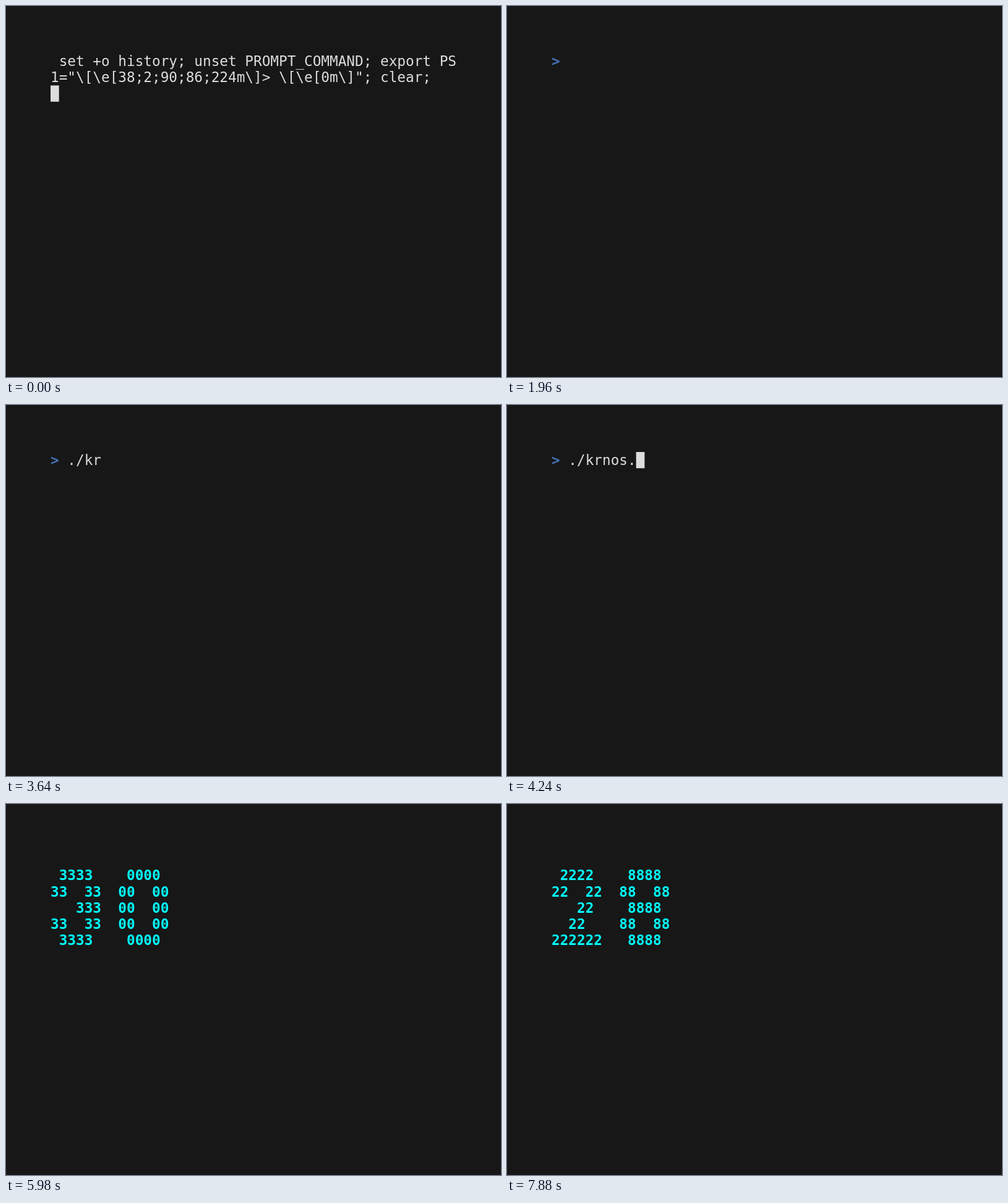
Animation, 800 px wide and 600 px high, one loop 8000 ms. Source, as an HTML page with a canvas:

```html
<!DOCTYPE html>
<html>
<head>
<meta charset="utf-8">
<style>
html, body { margin: 0; width: 100%; height: 100%; overflow: hidden; background: #171717; }
canvas { display: block; }
</style>
</head>
<body>
<canvas id="stage" width="800" height="600"></canvas>
<script>
const ctx = document.getElementById('stage').getContext('2d');
const LOOP = 8000, LEFT = 72, TOP = 76, CELL = 13.667, LINE = 26.25, BASE = 21;
const FONT = '22.6px "DejaVu Sans Mono", monospace';
const INK = '#dddddd', BLUE = '#4474b8', CYAN = '#00ffff';

const SETUP = [
  ' set +o history; unset PROMPT_COMMAND; export PS',
  '1="\\[\\e[38;2;90;86;224m\\]> \\[\\e[0m\\]"; clear;'
];
const COMMAND = './krnos.sh';
const KEYS = [2400, 2480, 3000, 3060, 4080, 4140, 4180, 4240, 4780, 4840];

// Five rows per digit; # is replaced by the digit itself.
const DIGITS = {
  0: [' ####', '##  ##', '##  ##', '##  ##', ' ####'],
  2: [' ####', '##  ##', '   ##', '  ##', '######'],
  3: [' ####', '##  ##', '   ###', '##  ##', ' ####'],
  8: [' ####', '##  ##', ' ####', '##  ##', ' ####'],
  9: [' ####', '##  ##', ' #####', '    ##', ' ####']
};

// Times at which the cursor becomes visible or hidden.
const BLINKS = [0, 800, 1380, 1960, 2420, 3640, 4080, 5980, 6320, 6920, 7300, 7880];
const cursorOn = t => BLINKS.filter(b => b <= t).length % 2 === 1;

function write(text, col, row, color = INK, weight = '') {
  ctx.font = weight + ' ' + FONT;
  ctx.letterSpacing = '0px';
  ctx.letterSpacing = CELL - ctx.measureText('0').width + 'px';
  ctx.fillStyle = color;
  ctx.fillText(text, LEFT + col * CELL, TOP + row * LINE + BASE);
}

function cursor(col, row, t) {
  if (!cursorOn(t)) return;
  ctx.fillStyle = INK;
  ctx.fillRect(LEFT + col * CELL, TOP + row * LINE, CELL, LINE);
}

function count(number, t) {
  [...String(number)].forEach((digit, place) =>
    DIGITS[digit].forEach((line, row) =>
      write(line.replace(/#/g, digit), place * 8, row + 1, CYAN, 'bold')));
  cursor(0, 6, t);
}

function draw(t) {
  ctx.fillStyle = '#171717';
  ctx.fillRect(0, 0, 800, 600);
  if (t < 200) {
    SETUP.forEach((line, row) => write(line, 0, row));
    cursor(0, 2, t);
  } else if (t < 5380) {
    const typed = KEYS.filter(k => k <= t).length;
    write('>', 0, 0, BLUE, 'bold');
    write(COMMAND.slice(0, typed), 2, 0);
    cursor(2 + typed, 0, t);
  } else {
    // The screen clears for 20 ms before each new number.
    const second = Math.floor((t - 5380) / 950);
    const start = [5400, 6340, 7300][second];
    const next = [6320, 7280, LOOP][second];
    if (t >= next) cursor(0, 0, t);
    else if (t < start) cursor(0, 0, t);
    else count(30 - second, t);
  }
}

const CLEARS = [5380, 6320, 7280];
const origin = performance.now();

function tick() {
  const t = (performance.now() - origin) % LOOP;
  draw(t);
  requestAnimationFrame(tick);
}
tick();
</script>
</body>
</html>
```
